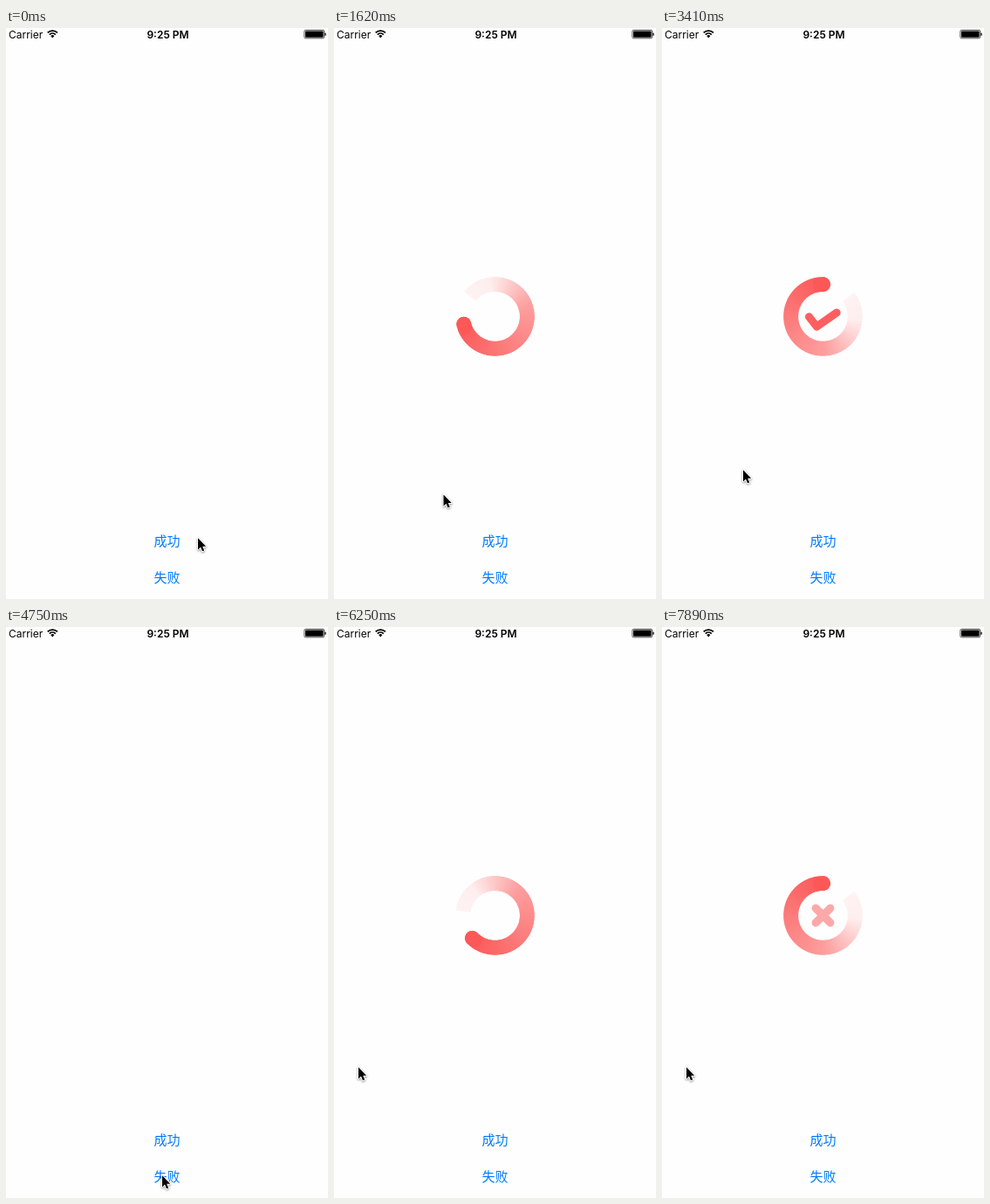
These frames come from a looping animation (369 by 654 pixels, 8000 ms). An HTML page with a canvas:

```html
<!DOCTYPE html>
<html lang="zh">
<head>
<meta charset="utf-8">
<style>
  html, body { margin: 0; width: 100%; height: 100%; overflow: hidden; background: #fefefe; }
  canvas { display: block; width: 369px; height: 654px; }
</style>
</head>
<body>
<canvas id="stage" width="369" height="654"></canvas>
<script>
const W = 369, H = 654, LOOP = 8000, STEP = 148.6;
const CX = 184.5, CY = 330.4, RADIUS = 36.8, THICK = 17;
const RAD = Math.PI / 180;
const ctx = document.getElementById('stage').getContext('2d');

const spinners = [
  { show: 872, spin: 916, mark: 3060, hide: 3900, fade: 300, shape: [[[-16, .4], [-7.2, 11.6], [15.7, -4.4]]] },
  { show: 5609, spin: 5609, mark: 7721, hide: 9000, fade: 280, shape: [[[-8.4, -8.4], [8.4, 8.4]], [[8.4, -8.4], [-8.4, 8.4]]] }
];

const cursorPath = [
  [20, 220, 584], [290, 100, 561], [587, 183, 584],
  [1230, 183, 584], [1900, 93, 506],
  [3900, 93, 506], [4740, 179, 628],
  [5700, 179, 628], [6230, 28, 504]
];

const clamp = v => Math.max(0, Math.min(1, v));
const progress = (t, start, length) => clamp((t - start) / length);
const smooth = p => p * p * (3 - 2 * p);
const mix = (a, b, p) => a + (b - a) * p;

function sampleStops(stops, p) {
  const i = Math.max(1, stops.findIndex(s => s[0] >= p));
  const [a, b] = [stops[i - 1], stops[i]];
  return mix(a[1], b[1], (p - a[0]) / (b[0] - a[0]));
}

function polyline(c, points) {
  c.beginPath();
  points.forEach(([x, y]) => c.lineTo(x, y));
}

// Ring with its head at 12 o'clock, fading back to a flat tail.
function makeRing() {
  const size = 112, canvas = document.createElement('canvas');
  canvas.width = canvas.height = size * 2;
  const c = canvas.getContext('2d');
  c.scale(2, 2);
  c.translate(size / 2, size / 2);
  c.lineWidth = THICK;
  const span = 307.5, count = 62, tail = -90 - span;
  const stops = [[0, .075], [.13, .09], [.25, .31], [.4, .58], [.69, .78], [1, 1]];
  for (let i = 0; i < count; i++) {
    const k = sampleStops(stops, i / (count - 1));
    const gb = Math.round(mix(254, 88, k));
    c.strokeStyle = `rgb(${Math.round(mix(254, 252, k))},${gb},${gb})`;
    c.lineCap = i === count - 1 ? 'round' : 'butt';
    const from = tail + span * i / count;
    const to = Math.min(-90, from + span / count + .5);
    c.beginPath();
    c.arc(0, 0, RADIUS, from * RAD, to * RAD);
    c.stroke();
    if (i === count - 1) {
      c.fillStyle = c.strokeStyle;
      c.beginPath();
      c.arc(0, -RADIUS, THICK / 2, 0, 7);
      c.fill();
    }
  }
  return canvas;
}
const ring = makeRing();

function popScale(age) {
  return age < 180 ? 1.1 * age / 180 : mix(1.1, 1, progress(age, 180, 220));
}

function drawSpinner(t, s) {
  const alpha = 1 - progress(t, s.hide, 300);
  if (t < s.show || alpha <= 0) return;
  const scale = popScale(t - s.show);
  ctx.save();
  ctx.translate(CX, CY);
  ctx.scale(scale, scale);
  ctx.globalAlpha = alpha;
  ctx.save();
  if (t < s.mark) ctx.rotate(Math.max(0, t - s.spin) * .36 * RAD);
  ctx.drawImage(ring, -56, -56, 112, 112);
  ctx.restore();
  if (t > s.mark) {
    ctx.globalAlpha = alpha * smooth(progress(t, s.mark, s.fade));
    ctx.strokeStyle = '#fc5f5f';
    ctx.lineWidth = 9;
    ctx.lineCap = ctx.lineJoin = 'round';
    // One path, so crossing strokes do not darken where they overlap.
    ctx.beginPath();
    s.shape.forEach(line => line.forEach(([x, y], i) => i ? ctx.lineTo(x, y) : ctx.moveTo(x, y)));
    ctx.stroke();
  }
  ctx.restore();
}

function text(str, x, y, font, color, align) {
  ctx.font = font;
  ctx.fillStyle = color;
  ctx.textAlign = align;
  ctx.fillText(str, x, y);
}

function drawStatusBar() {
  text('Carrier', 3, 11.5, '12px Inter, sans-serif', '#000', 'left');
  text('9:25 PM', 185.5, 11.5, '600 12px Inter, sans-serif', '#000', 'center');

  ctx.strokeStyle = ctx.fillStyle = '#000';
  ctx.lineWidth = 1.8;
  [8.1, 5.1].forEach(r => {
    ctx.beginPath();
    ctx.arc(53.3, 11.2, r, -134 * RAD, -46 * RAD);
    ctx.stroke();
  });
  ctx.beginPath();
  ctx.moveTo(53.3, 11.4);
  ctx.arc(53.3, 11.2, 3, -134 * RAD, -46 * RAD);
  ctx.fill();

  ctx.lineWidth = .7;
  ctx.beginPath();
  ctx.roundRect(341.9, 2.4, 22.8, 9.4, 1.6);
  ctx.stroke();
  ctx.beginPath();
  ctx.roundRect(343, 3.4, 20.6, 7.4, .7);
  ctx.roundRect(365.3, 5.4, 1.3, 3.4, .6);
  ctx.fill();
}

function drawButtons(t) {
  [['成功', 593, 872], ['失败', 635, 5609]].forEach(([label, y, press]) => {
    ctx.globalAlpha = t < press ? 1 : mix(.3, 1, progress(t, press, 300));
    text(label, CX, y, '15px "Noto Sans CJK SC", "Noto Sans CJK", sans-serif', '#007aff', 'center');
  });
  ctx.globalAlpha = 1;
}

function cursorAt(t) {
  const next = cursorPath.findIndex(k => k[0] > t);
  if (next === 0) return cursorPath[0].slice(1);
  if (next < 0) return cursorPath[cursorPath.length - 1].slice(1);
  const a = cursorPath[next - 1], b = cursorPath[next];
  const p = smooth(progress(t, a[0], b[0] - a[0]));
  return [mix(a[1], b[1], p), mix(a[2], b[2], p)];
}

function drawCursor(t) {
  const [x, y] = cursorAt(t);
  ctx.save();
  ctx.translate(x, y);
  polyline(ctx, [[0, .3], [0, 13.4], [3, 10.6], [5, 15.3], [7.2, 14.4], [5.2, 9.8], [9.2, 9.8]]);
  ctx.closePath();
  ctx.lineJoin = 'round';
  ctx.lineWidth = 1.8;
  ctx.strokeStyle = '#fff';
  ctx.shadowColor = 'rgba(0,0,0,.45)';
  ctx.shadowBlur = 2.5;
  ctx.shadowOffsetY = 1;
  ctx.stroke();
  ctx.shadowColor = 'transparent';
  ctx.fillStyle = '#000';
  ctx.fill();
  ctx.restore();
}

function draw(clock) {
  // The motion is sampled at a low, fixed rate.
  const t = Math.max(0, Math.floor((clock % LOOP + 14) / STEP) * STEP - 7);
  ctx.fillStyle = '#fefefe';
  ctx.fillRect(0, 0, W, H);
  drawStatusBar();
  drawButtons(t);
  spinners.forEach(s => drawSpinner(t, s));
  drawCursor(t);
}

const begin = performance.now();
function tick() {
  draw(performance.now() - begin);
  requestAnimationFrame(tick);
}
tick();
</script>
</body>
</html>
```
